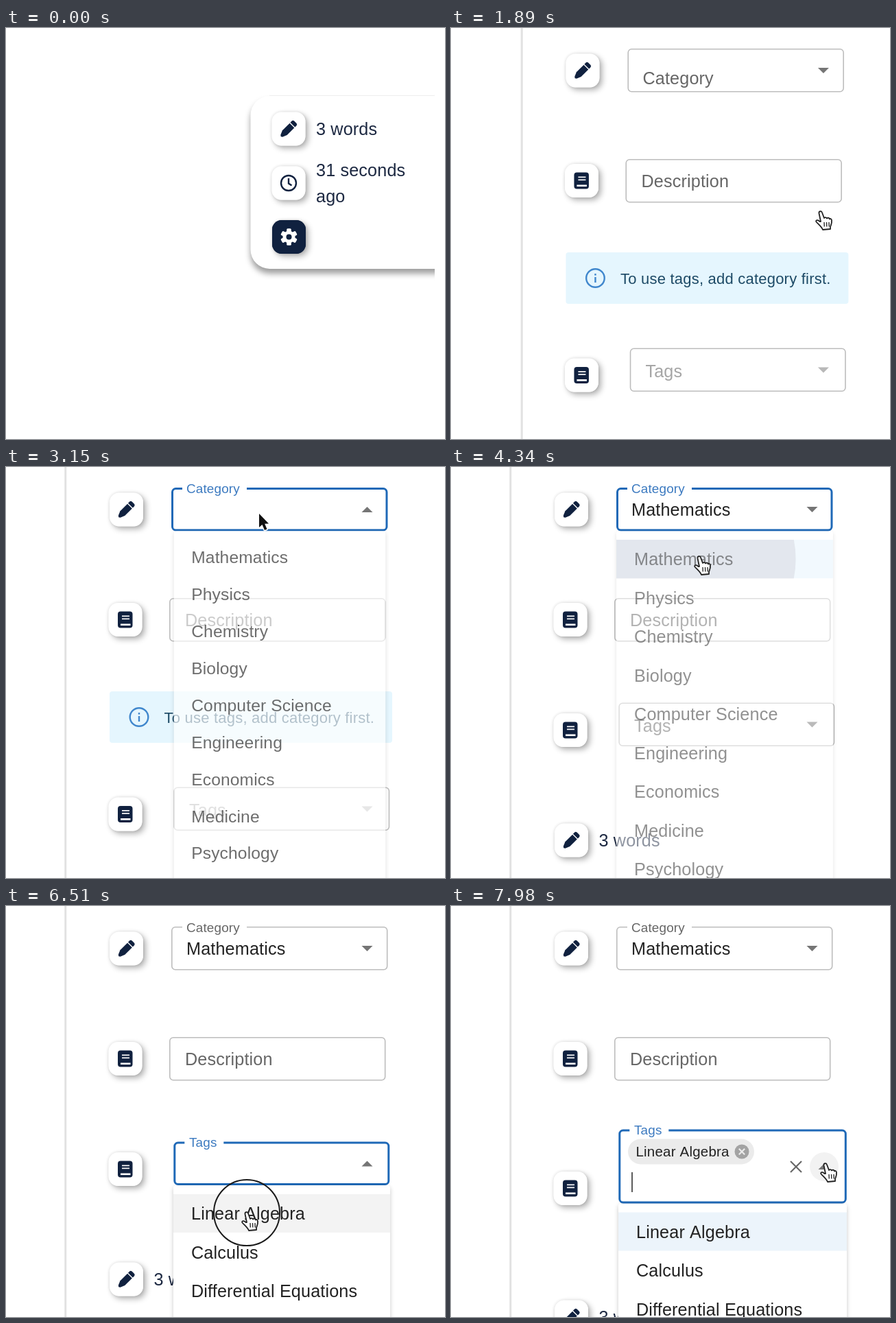
These frames come from a looping animation (640 by 599 pixels, 8 s). An HTML page with a canvas:

```html
<!DOCTYPE html>
<html lang="en">
<head>
<meta charset="utf-8">
<title>Document settings</title>
<style>
html, body { margin: 0; width: 100%; height: 100%; overflow: hidden; background: #fff; }
canvas { display: block; width: 640px; height: 599px; }
</style>
</head>
<body>
<canvas id="stage" width="640" height="599"></canvas>
<script>
const ctx = document.getElementById('stage').getContext('2d');
const LOOP = 8000, NAVY = '#10213f', BLUE = '#1f69b7', LABEL_BLUE = '#3c7ac0';
const GREY = '#666', LINE = '#bdbdbd', INK = '#222';
const SUBJECTS = ['Mathematics', 'Physics', 'Chemistry', 'Biology', 'Computer Science',
  'Engineering', 'Economics', 'Medicine', 'Psychology', 'Philosophy'];
const TOPICS = ['Linear Algebra', 'Calculus', 'Differential Equations', 'Statistics'];
const STEP = 56.6;

// Moments of the story, in ms
const T = { tick: 490, cardOut: 1372, drawerIn: 1680, openCategory: 3011, pick: 4225,
  focusTags: 5740, openTags: 5880, addTag: 6650, reopen: 7800 };

// Pointer stops: time, x, y
const STOPS = [[280, 520, 428], [630, 470, 330], [770, 470, 330], [980, 412, 304],
  [1200, 412, 304], [1450, 539, 268], [2300, 539, 268], [2870, 369, 68], [3290, 369, 68],
  [3780, 362, 131], [5040, 362, 131], [5500, 350, 372], [5950, 350, 372], [6300, 351, 447],
  [6860, 351, 447], [7350, 572, 395], [7630, 546, 376]];
const HAND_TIMES = [[900, 2350], [3400, 5100], [6050, 6950], [7500, 8000]];
const PRESSES = [[1060, 1200], [2900, 3010], [4130, 4225], [5640, 5740], [6440, 6600], [7680, 7800]];

const clamp = v => Math.max(0, Math.min(1, v));
const span = (t, start, length) => clamp((t - start) / length);
const mix = (a, b, k) => a + (b - a) * k;
const within = (t, list) => list.some(([a, b]) => t >= a && t < b);

// cubic-bezier(.4, 0, .2, 1)
function ease(x) {
  let lo = 0, hi = 1, u = x;
  for (let i = 0; i < 20; i++) {
    u = (lo + hi) / 2;
    const at = 1.2 * (1 - u) ** 2 * u + 0.6 * (1 - u) * u * u + u ** 3;
    if (at < x) lo = u; else hi = u;
  }
  return 3 * (1 - u) * u * u + u ** 3;
}

function text(s, x, y, color = INK, size = 25.2, spacing = 0.15) {
  ctx.font = `${size}px "Liberation Sans", Arial, sans-serif`;
  ctx.letterSpacing = spacing + 'px';
  ctx.fillStyle = color;
  ctx.fillText(s, x, y);
}

function box(x, y, w, h, r, fill) {
  ctx.beginPath();
  ctx.roundRect(x, y, w, h, r);
  if (fill) { ctx.fillStyle = fill; ctx.fill(); }
}

function line(color, width, ...points) {
  ctx.beginPath();
  points.forEach(([x, y]) => ctx.lineTo(x, y));
  ctx.strokeStyle = color;
  ctx.lineWidth = width;
  ctx.stroke();
}

function disc(x, y, r, fill) {
  ctx.beginPath();
  ctx.arc(x, y, r, 0, 7);
  if (fill) { ctx.fillStyle = fill; ctx.fill(); }
}

function shadow(color, blur, dx, dy) {
  ctx.shadowColor = color;
  ctx.shadowBlur = blur;
  ctx.shadowOffsetX = dx;
  ctx.shadowOffsetY = dy;
}
const noShadow = () => shadow('transparent', 0, 0, 0);

const icons = {
  pencil() {
    ctx.rotate(-Math.PI / 4);
    ctx.fillStyle = NAVY;
    ctx.beginPath();
    [[-16, 0], [-14.5, -2], [-8, -4.8], [7, -4.8], [7, 4.8], [-8, 4.8], [-14.5, 2]]
      .forEach(([x, y]) => ctx.lineTo(x, y));
    ctx.fill();
    box(8.3, -4.8, 5.5, 9.6, [0, 2.5, 2.5, 0], NAVY);
  },
  book() {
    box(-11, -12, 21.5, 24, 4, NAVY);
    ctx.fillStyle = '#fff';
    ctx.fillRect(-5, -6, 11, 1.7);
    ctx.fillRect(-5, -2, 11, 1.7);
    ctx.fillRect(-7, 6, 14.5, 2.6);
  },
  clock() {
    disc(0, 0, 11);
    ctx.strokeStyle = NAVY;
    ctx.lineWidth = 2.4;
    ctx.stroke();
    line(NAVY, 2.4, [0, -7], [0, 0.5], [4.5, 3.5]);
  },
  gear() {
    disc(0, 0, 9, '#fff');
    for (let i = 0; i < 6; i++) {
      box(-3.3, -12.3, 6.6, 8, 1.5, '#fff');
      ctx.rotate(Math.PI / 3);
    }
    disc(0, 0, 4, NAVY);
  }
};

function tile(x, y, icon, fill = '#fff') {
  shadow('rgba(0,0,0,.3)', 9, 4, 4);
  box(x - 24.5, y - 24.5, 49, 49, 14, fill);
  shadow('rgba(0,0,0,.12)', 4, 0, 0);
  box(x - 24.5, y - 24.5, 49, 49, 14, fill);
  noShadow();
  ctx.save();
  ctx.translate(x, y);
  icons[icon]();
  ctx.restore();
}

function triangle(x, y, color, up) {
  const d = up ? -4 : 4;
  ctx.beginPath();
  ctx.moveTo(x - 8, y - d);
  ctx.lineTo(x + 8, y - d);
  ctx.lineTo(x, y + d);
  ctx.fillStyle = color;
  ctx.fill();
}

// Outlined field with the border inside its box; gap is the notch for the label
function field(x, y, w, h, focus, gap = 0) {
  const width = focus ? 3 : 1.6, inset = width / 2;
  box(x + inset, y + inset, w - width, h - width, 5);
  ctx.strokeStyle = focus ? BLUE : LINE;
  ctx.lineWidth = width;
  ctx.stroke();
  if (gap) {
    ctx.fillStyle = '#fff';
    ctx.fillRect(x + 16, y - 1, gap, 5);
  }
}

function floatLabel(s, x, low, high, k, color) {
  text(s, x, mix(low, high, k), color, mix(25.2, 18.9, k));
}

// The shadow stays outside the sheet, so that a fading sheet shows none through
function paper(x, y, w) {
  const h = 640;
  ctx.save();
  ctx.beginPath();
  ctx.rect(x - 30, y - 30, w + 60, h + 60);
  ctx.roundRect(x, y, w, h, 4);
  ctx.clip('evenodd');
  shadow('rgba(0,0,0,.22)', 6, 0, 2);
  box(x, y, w, h, 4, '#fff');
  ctx.restore();
  box(x, y, w, h, 4, '#fff');
}

function drawCard(t) {
  ctx.save();
  ctx.translate(269 * span(t, T.cardOut, 280) ** 2, 0);
  shadow('rgba(0,0,0,.38)', 8, 0, 7);
  box(356.5, 99, 400, 252, 28, '#fff');
  noShadow();
  line('#eee', 1, [384, 98.5], [700, 98.5]);
  tile(412, 147, 'pencil');
  tile(412, 226, 'clock');
  tile(412.5, 304.5, 'gear', NAVY);
  text('3 words', 452, 156, '#1d2942');
  text(`${t < T.tick ? 31 : 32} seconds`, 452, 216, '#1d2942');
  text('ago', 452, 254, '#1d2942');
  ctx.restore();
}

function drawInfo() {
  box(151, 327, 412, 75, 4, '#e5f6fe');
  disc(194, 364.5, 13.3);
  ctx.strokeStyle = '#4087cd';
  ctx.lineWidth = 2.4;
  ctx.stroke();
  ctx.fillStyle = '#4087cd';
  ctx.fillRect(192.8, 363, 2.4, 8);
  ctx.fillRect(192.8, 358, 2.4, 2.6);
  text('To use tags, add category first.', 230.5, 372.5, '#1d4a66', 22, 0.22);
}

function drawCategory(t) {
  const picked = t >= T.pick, focus = t >= T.openCategory && t < T.focusTags;
  const k = ease(span(t, T.openCategory, 140));
  field(241, 30, 315.5, 63.5, focus, 94 * k);
  floatLabel('Category', 263, 82, 37.5, k, focus ? LABEL_BLUE : GREY);
  if (picked) text('Mathematics', 263, 71);
  triangle(526.5, 62, '#757575', focus && !picked);
}

function drawTags(t) {
  const ready = t >= T.pick, focus = t >= T.focusTags, tagged = t >= T.addTag;
  const open = isTagListOpen(t);
  const top = tagged ? 325.5 : ready ? 343.5 : 466.5;
  const k = ease(span(t, T.focusTags, 120));
  field(244.3, top, tagged ? 332.5 : 315, tagged ? 108 : 63.5, focus, 57 * k);
  const color = focus ? LABEL_BLUE : ready ? GREY : '#a6a6a6';
  floatLabel('Tags', 267, top + 42, top + 7, k, color);
  const blinkFrom = tagged ? T.addTag : T.focusTags;
  const caret = focus && Math.floor((t - blinkFrom) / 530) % 2 === 0;
  if (!tagged) {
    triangle(526.5, top + 32, ready ? '#757575' : '#b8b8b8', open);
    if (caret) line('#333', 1.6, [267, 362], [267, 390]);
    return;
  }
  box(258, 339.5, 184, 37, 18.5, '#ebebeb');
  text('Linear Algebra', 269.5, 365, INK, 20.5, 0.2);
  disc(424, 358, 10.5, '#a3a3a3');
  cross(424, 358, 4.2, '#ebebeb', 2.2);
  cross(503, 380, 8, '#666', 2.2);
  if (t >= 7500) disc(544, 380, 21, '#f2f2f2');
  triangle(543.5, 380, '#757575', open);
  if (caret) line('#333', 1.6, [264, 388], [264, 417]);
}

function cross(x, y, r, color, width) {
  line(color, width, [x - r, y - r], [x + r, y + r]);
  line(color, width, [x - r, y + r], [x + r, y - r]);
}

const isTagListOpen = t => t >= T.openTags && t < T.addTag || t >= T.reopen;

function drawTagList(t) {
  if (!isTagListOpen(t)) return;
  const tagged = t >= T.addTag;
  const top = tagged ? 434 : 407.5, w = tagged ? 333 : 316;
  paper(244, top, w);
  const hover = !tagged && t >= 6150;
  if (tagged || hover) {
    ctx.fillStyle = tagged ? '#ecf4fb' : '#f3f3f3';
    ctx.fillRect(244, top + 12.5, w, 56);
  }
  TOPICS.forEach((s, i) => text(s, 270, top + 49.5 + STEP * i));
}

function drawSubjects(t) {
  const length = 330, leaving = t >= T.pick;
  const p = (t - (leaving ? T.pick : T.openCategory)) / length;
  if (p < 0 || leaving && p >= 1) return;
  const fade = ease(clamp(p));
  const grow = leaving ? 1 - ease(clamp((p - 0.333) / 0.666)) : ease(clamp(p / 0.666));
  const s = 0.75 + 0.25 * grow;
  ctx.save();
  ctx.globalAlpha = leaving ? 1 - fade : fade;
  ctx.translate(399, 88.5);
  ctx.scale(s, s * s);
  ctx.translate(-399, -88.5);
  paper(241, 93.5, 316);
  if (t >= 3550) {
    ctx.save();
    ctx.beginPath();
    ctx.rect(241, 106, 316, 56.5);
    ctx.clip();
    ctx.fillStyle = leaving ? '#e4f2fc' : '#f3f3f3';
    ctx.fillRect(241, 106, 316, 56.5);
    if (t >= 4130) disc(362, 134, 140 * (t - 4130) / 210, 'rgba(30,10,30,.14)');
    ctx.restore();
  }
  SUBJECTS.forEach((name, i) => text(name, 267, 143 + STEP * i));
  ctx.restore();
}

function drawDrawer(t) {
  const rest = (1 - span(t, T.drawerIn, 307)) ** 3;
  const ready = t >= T.pick, tagged = t >= T.addTag;
  ctx.save();
  ctx.translate(538 * rest, 0);
  ctx.fillStyle = '#fff';
  ctx.fillRect(87, 0, 540, 599);
  ctx.fillStyle = '#ebebeb';
  ctx.fillRect(85, 0, 3.5, 599);
  ctx.fillStyle = '#dedede';
  ctx.fillRect(86, 0, 1.4, 599);
  tile(175.5, 62, 'pencil');
  drawCategory(t);
  tile(174, 222.5, 'book');
  field(238, 191, 315.5, 63.5, false);
  text('Description', 261, 232, GREY);
  if (!ready) drawInfo();
  tile(174, tagged ? 411.5 : ready ? 383.5 : 506, 'book');
  drawTags(t);
  const words = tagged ? 599 : ready ? 544 : 666;
  tile(175.5, words, 'pencil');
  text('3 words', 215.5, words + 9, '#1d2942');
  drawTagList(t);
  drawSubjects(t);
  ctx.restore();
}

function pointerAt(t) {
  const next = STOPS.findIndex(s => s[0] > t);
  if (next < 0) return STOPS[STOPS.length - 1].slice(1);
  const [t0, x0, y0] = STOPS[next - 1], [t1, x1, y1] = STOPS[next];
  const k = ease((t - t0) / (t1 - t0));
  return [mix(x0, x1, k), mix(y0, y1, k)];
}

const HAND = new Path2D('M-2.5 2C-3-1 1-2 2 1L5 9C6 7.5 8.5 8 9 9.5C10 8 12.5 8.5 13 10.5' +
  'C14 9.5 16 10 16 12.5C16.5 17 14.5 19.5 14 22L14 25L3 26C1.5 22-3 18.5-6.5 14.5C-8 12-4 11-1.5 14L0 14Z');
const ARROW = new Path2D('M0 0L0 20L4.5 16L8 24L11.5 22.5L8.2 14.7L14 14.4Z');

function drawPointer(t) {
  if (t < STOPS[0][0]) return;
  const [x, y] = pointerAt(t);
  ctx.save();
  ctx.translate(x, y);
  ctx.lineJoin = 'round';
  if (within(t, HAND_TIMES)) {
    ctx.fillStyle = '#fff';
    ctx.fill(HAND);
    ctx.strokeStyle = '#222';
    ctx.lineWidth = 1.8;
    ctx.stroke(HAND);
    [5, 8.5, 12].forEach(n => line('#222', 1.3, [n, 15], [n + 0.3, 21.5]));
  } else {
    ctx.strokeStyle = '#fff';
    ctx.lineWidth = 3;
    ctx.stroke(ARROW);
    ctx.fillStyle = '#111';
    ctx.fill(ARROW);
  }
  if (within(t, PRESSES)) {
    disc(0, 0, 48);
    ctx.strokeStyle = '#1a1a1a';
    ctx.lineWidth = 2;
    ctx.stroke();
  }
  ctx.restore();
}

function draw() {
  const t = performance.now() % LOOP;
  ctx.fillStyle = '#fff';
  ctx.fillRect(0, 0, 640, 599);
  ctx.save();
  ctx.beginPath();
  ctx.rect(0, 0, 625, 599);
  ctx.clip();
  if (t < T.drawerIn) drawCard(t); else drawDrawer(t);
  drawPointer(t);
  ctx.restore();
  requestAnimationFrame(draw);
}
draw();
</script>
</body>
</html>
```
